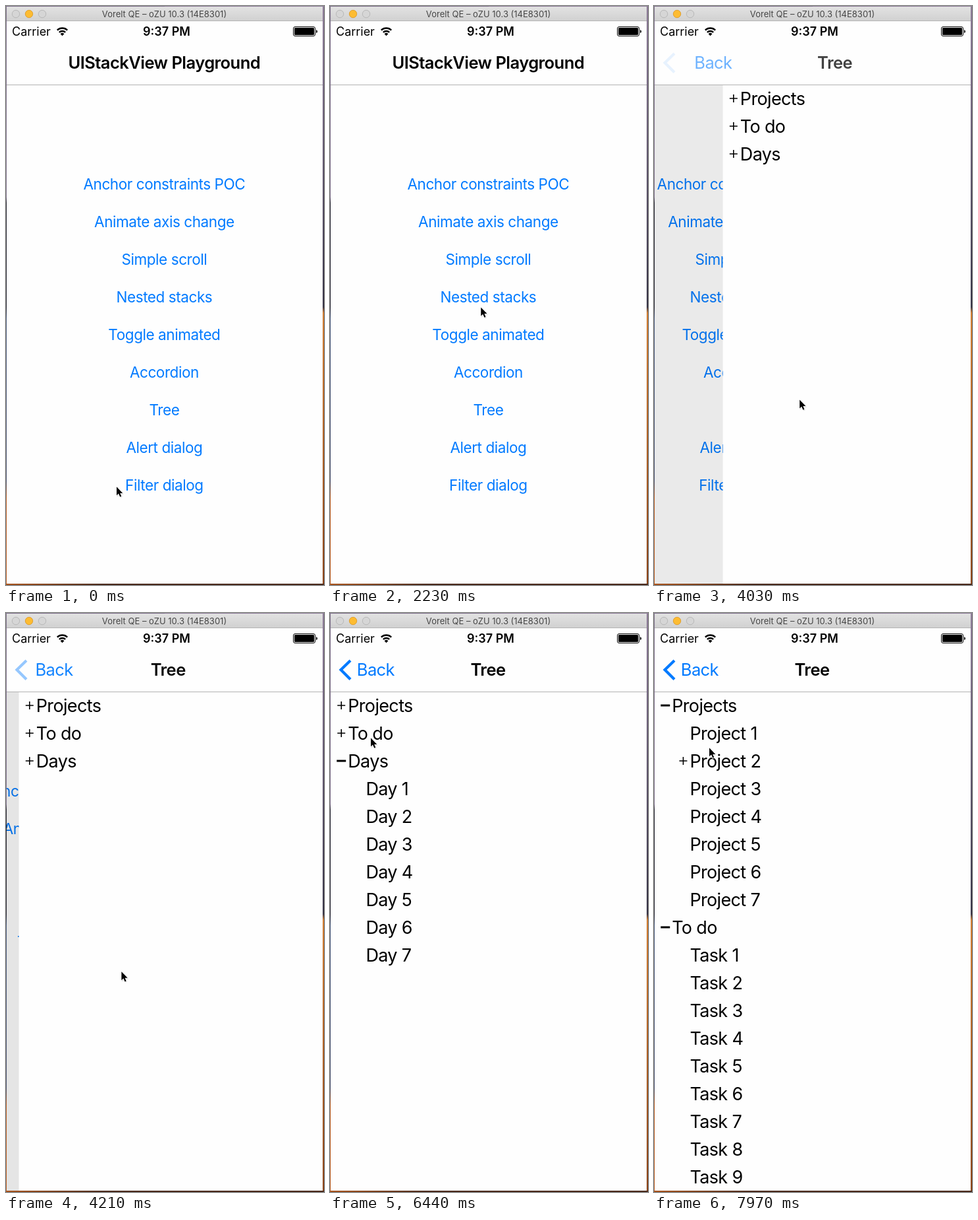
These frames come from a looping animation (483x877 px, 8 s). An HTML page:

```html
<!DOCTYPE html>
<html lang="en">
<head>
<meta charset="utf-8">
<title>Stack view playground</title>
<style>
  html, body { margin: 0; width: 100%; height: 100%; overflow: hidden; background: #fff; }
  svg { display: block; }
  text { font-family: Inter, "Liberation Sans", sans-serif; font-optical-sizing: none; white-space: pre; }
  .mid { text-anchor: middle; }
  .window { font-size: 13px; fill: #464646; }
  .status { font-size: 18px; }
  .bold { font-weight: 600; }
  .nav { font-size: 25.5px; letter-spacing: -.6px; }
  .nav.bold { letter-spacing: -.53px; }
  .blue { fill: #007aff; }
  .menu { font-size: 22.5px; letter-spacing: -.43px; }
  .row { font-size: 27px; letter-spacing: -.65px; }
  .plus { stroke: #000; stroke-width: 1.6; }
  .minus { stroke: #000; stroke-width: 3; }
</style>
</head>
<body>
<svg width="483" height="877" viewBox="0 0 483 877">
  <defs>
    <linearGradient id="left" x2="0" y2="1">
      <stop offset=".33" stop-color="#7d6f8a"/>
      <stop offset=".34" stop-color="#22212d"/>
      <stop offset=".52" stop-color="#22212d"/>
      <stop offset=".54" stop-color="#47597c"/>
      <stop offset=".82" stop-color="#47506c"/>
      <stop offset=".85" stop-color="#b85c20"/>
    </linearGradient>
    <linearGradient id="right" x2="0" y2="1">
      <stop offset="0" stop-color="#8d7c98"/>
      <stop offset=".52" stop-color="#353244"/>
      <stop offset=".53" stop-color="#d07c30"/>
      <stop offset="1" stop-color="#8a4318"/>
    </linearGradient>
    <linearGradient id="floor">
      <stop offset="0" stop-color="#a8541d"/>
      <stop offset=".3" stop-color="#4a2a1c"/>
    </linearGradient>
    <linearGradient id="chrome" x2="0" y2="1">
      <stop offset="0" stop-color="#e2e2e2"/>
      <stop offset="1" stop-color="#d1d1d1"/>
    </linearGradient>
    <clipPath id="body"><path d="M1 120H481V875H1Z"/></clipPath>
  </defs>

  <rect width="242" height="877" fill="url(#left)"/>
  <rect x="241" width="242" height="877" fill="url(#right)"/>
  <rect y="875" width="483" height="2" fill="url(#floor)"/>
  <rect x="1" y="1" width="480" height="874" fill="#fefefe"/>

  <rect x="1" y="1" width="480" height="21" fill="url(#chrome)"/>
  <path d="M1 22.5H481" stroke="#b4b4b4"/>
  <g stroke="#b9b9b9" fill="#d6d6d6">
    <circle cx="15" cy="12" r="5.7"/>
    <circle cx="35" cy="12" r="5.7" fill="#fdbc32" stroke="#dfa032"/>
    <circle cx="55" cy="12" r="5.7"/>
  </g>
  <text class="window mid" x="240.5" y="17">Vorelt QE – oZU 10.3 (14E8301)</text>

  <text class="status" x="9" y="45">Carrier</text>
  <g fill="none" stroke="#000" stroke-width="2.4">
    <path d="M77.8 36.7a11 11 0 0 1 15.4 0"/>
    <path d="M80.8 39.9a6.8 6.8 0 0 1 9.4 0"/>
  </g>
  <path d="M85.5 45.2l-2.9-3a4.2 4.2 0 0 1 5.8 0z"/>
  <text class="status bold mid" x="244" y="45">9:37 PM</text>
  <rect x="436.5" y="31.5" width="33" height="14" rx="2.5" fill="none" stroke="#000"/>
  <rect x="438" y="33" width="30" height="11" rx="1.3"/>
  <path d="M471 36v5q2-.5 2-2.5t-2-2.5z"/>

  <text id="home" class="nav bold mid" x="240.3" y="95">UIStackView Playground</text>
  <text id="tree" class="nav bold mid" x="240" y="95">Tree</text>
  <path id="chevron" d="M31 72L16.5 86L31 100.5" fill="none" stroke="#007aff" stroke-width="4.2"/>
  <text id="back" class="nav blue" x="40.8" y="95">Back</text>
  <path d="M1 119.5H481" stroke="#b2b2b2"/>

  <g clip-path="url(#body)">
    <g id="menuPage"></g>
    <rect id="dim" x="1" y="120" width="480" height="755"/>
    <g id="treePage">
      <rect x="1" y="120" width="480" height="755" fill="#fefefe"/>
      <g id="rows"></g>
    </g>
  </g>

  <g id="cursor">
    <path d="M1.5 3V16.5L4.700 13.600L7 18L9.500 17L7.700 12.600H12Z" opacity=".16"/>
    <path d="M1 1.300V14.300L4 11.600L6.200 16.600L8.300 15.700L6.200 10.900H10.300Z"
      stroke="#fff" stroke-width="1.800" paint-order="stroke"/>
  </g>
</svg>

<script>
const LOOP = 8000, PUSH = 3790, WIDTH = 480;
const $ = id => document.getElementById(id);
const clamp = v => Math.max(0, Math.min(1, v));
const smooth = u => u * u * (3 - 2 * u);

const labels = ['Anchor constraints POC', 'Animate axis change', 'Simple scroll',
  'Nested stacks', 'Toggle animated', 'Accordion', 'Tree', 'Alert dialog', 'Filter dialog'];
$('menuPage').innerHTML = labels.map((label, i) =>
  `<text class="menu blue mid" x="240.4" y="${277.5 + 57 * i}">${label}</text>`).join('');

// Branches in display order; opensAt is when each one is expanded.
const branches = [
  { name: 'Projects', item: 'Project', count: 7, opensAt: 7610, nested: 2 },
  { name: 'To do', item: 'Task', count: 10, opensAt: 6590 },
  { name: 'Days', item: 'Day', count: 7, opensAt: 5300 }
];

const plus = (x, y) => `<path class="plus" d="M${x - 6} ${y}h12M${x} ${y - 6}v12"/>`;
const minus = (x, y) => `<path class="minus" d="M${x - 7} ${y}h14"/>`;

function treeMarkup(time) {
  let y = 140, out = '';
  const row = (depth, label, sign) => {
    const x = 27.2 * depth;
    out += `<text class="row" x="${x}" y="${y + 10}">${label}</text>`;
    if (sign) out += sign(x - 10, y);
    y += 42;
  };
  for (const b of branches) {
    const open = time >= b.opensAt;
    row(1, b.name, open ? minus : plus);
    for (let n = 1; open && n <= b.count; n++)
      row(2, `${b.item} ${n}`, n === b.nested && plus);
  }
  return out;
}

// Pointer gestures: each follows its curve, then rests until the next.
const gesture = (start, end, d) => {
  const path = document.createElementNS('http://www.w3.org/2000/svg', 'path');
  path.setAttribute('d', d);
  return { start, end, path, length: path.getTotalLength() };
};
const gestures = [
  gesture(0, 1000, 'M167 727C30 690 -95 480 102 364Q120 349 144 346'),
  gesture(1150, 1680, 'M144 346Q190 346 220 388'),
  gesture(1690, 2490, 'M220 388Q238 430 223 477'),
  gesture(2510, 3380, 'M223 477Q229 550 236 610'),
  gesture(3880, 5020, 'M236 610Q205 583 170 536C130 475 130 340 82 287C40 240 28 252 59 225'),
  gesture(5690, 6430, 'M59 225C-20 140 30 32 145 32C300 32 300 226 150 226Q100 226 61 188'),
  gesture(6610, 7270, 'M61 188Q80 185 70 143'),
  gesture(7780, 7970, 'M70 143L83 203')
];

function pointer(time) {
  const g = gestures.findLast(g => time >= g.start);
  const u = clamp((time - g.start) / (g.end - g.start));
  return g.path.getPointAtLength(g.length * smooth(u));
}

function place(id, x, y = 0) { $(id).setAttribute('transform', `translate(${x} ${y})`); }
function fade(id, alpha) { $(id).setAttribute('opacity', clamp(alpha)); }

let shown;
function render(time) {
  // Critically damped spring: 1 = menu, 0 = tree page in place.
  const w = Math.max(0, time - PUSH) * 0.012;
  const off = time > 4570 ? 0 : (1 + w) * Math.exp(-w);

  place('menuPage', -0.3 * WIDTH * (1 - off));
  place('treePage', WIDTH * off);
  fade('dim', 0.1 * (1 - off));

  place('home', -171 * (1 - off));
  fade('home', off * 1.6 - 0.6);
  place('tree', 160 * off);
  fade('tree', 1 - off * 1.2);
  place('back', 95 * off);
  fade('back', 1 - off * 2);
  fade('chevron', (time - 3980) / 560);

  const markup = treeMarkup(time);
  if (markup !== shown) $('rows').innerHTML = shown = markup;

  const p = pointer(time);
  place('cursor', p.x, p.y);
}

const begin = performance.now();
function tick() {
  render((performance.now() - begin) % LOOP);
  requestAnimationFrame(tick);
}
tick();
</script>
</body>
</html>
```
